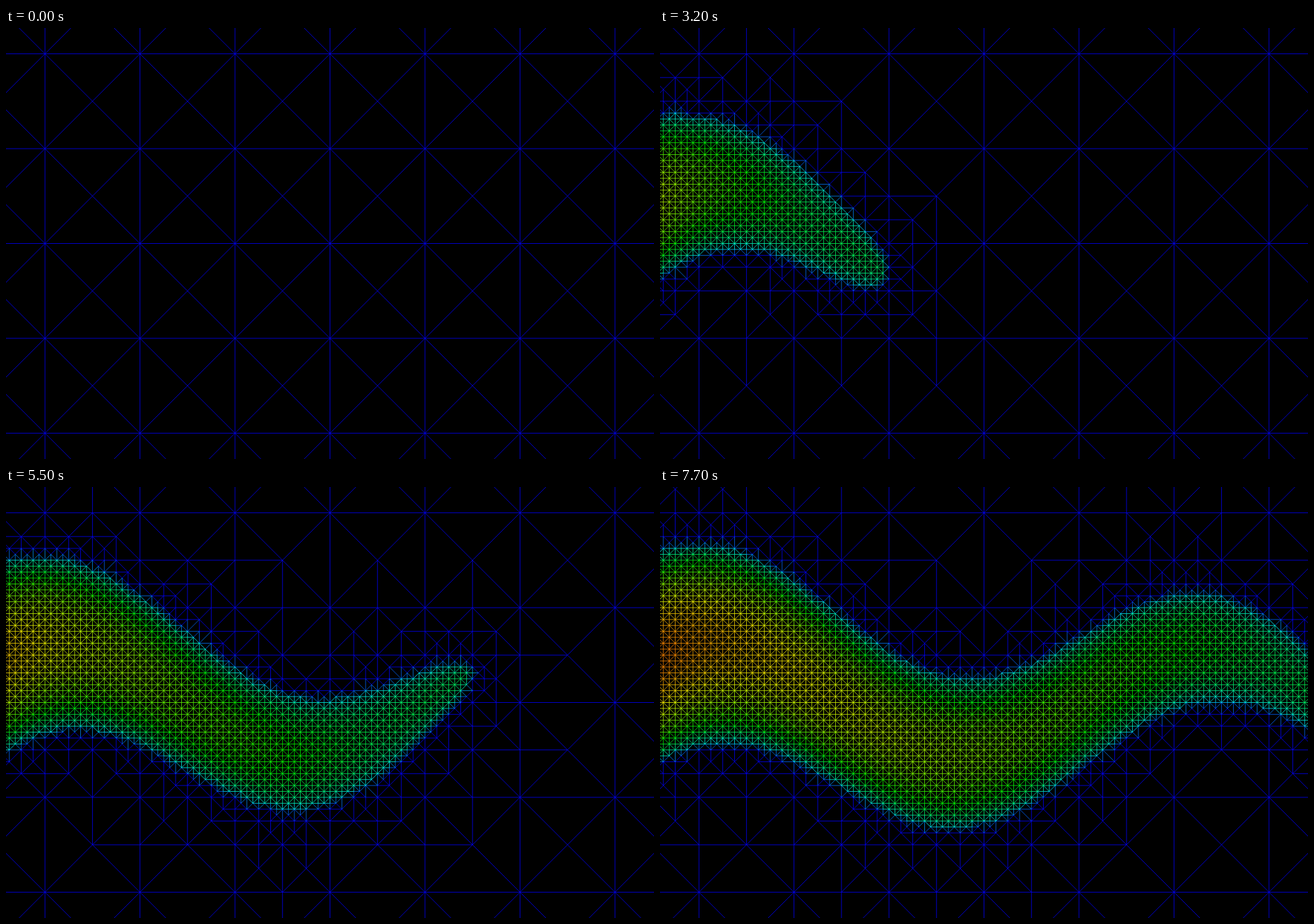
Write an HTML page with a canvas that moves like this. It is 917 px wide and 611 px high and loops after 8.7 s.

```html
<!DOCTYPE html>
<html lang="en">
<head>
<meta charset="utf-8">
<title>Adaptive mesh flow</title>
<style>
html, body { margin: 0; width: 100%; height: 100%; overflow: hidden; background: #000; }
canvas { display: block; }
</style>
</head>
<body>
<canvas id="stage" width="917" height="611"></canvas>
<script>
const stage = document.getElementById('stage');
const ctx = stage.getContext('2d');
const LOOP = 8700, STEP = 100, LAST = 77;

// Coarse cells of 16 units, each cut into four triangles, centred on the stage
const COLS = 10, ROWS = 6, CELL = 16, DEPTH = 7;
const PITCH = 134.45, UNIT = PITCH / CELL;
const LEFT = (stage.width - COLS * PITCH) / 2;
const TOP = (stage.height - ROWS * PITCH) / 2;
const W = COLS * CELL + 1, H = ROWS * CELL + 1;
const BLUE = 240, SOURCE = -45;

const clamp = (v, lo, hi) => Math.max(lo, Math.min(hi, v));
const mix = (a, b, t) => a + (b - a) * t;

// The front speeds up steadily
const frontAt = step => -51 + 10 * step + 0.0536 * step * step;

// The channel meanders as a cosine
const channel = x =>
  304 - 8 * Math.exp(-Math.max(x, 0) / 300) - 75 * Math.cos(2 * Math.PI * (x - 78) / 694);

// A parabolic nose, wider towards both ends, that thins as the flow lengthens
function halfWidth(front, x) {
  const behind = front - Math.max(x, SOURCE);
  if (behind <= 0) return 0;
  const along = clamp(x / Math.max(front, 1), 0, 1);
  const flare = 1 + 0.65 * (along - 0.35) ** 2;
  return 30 * Math.max(front, 90) ** -0.277 * flare * Math.sqrt(behind);
}

const levels = Array.from({ length: DEPTH + 1 }, () => []);

// a and b end the long side, c is the right angle
function triangle(level, a, b, c) {
  const node = { a, b, c, mid: (a + b) / 2, kids: null };
  levels[level].push(node);
  if (level < DEPTH) {
    node.kids = [triangle(level + 1, a, c, node.mid), triangle(level + 1, c, b, node.mid)];
  }
  return node;
}

for (let r = 0; r < ROWS; r++) {
  for (let c = 0; c < COLS; c++) {
    const nw = r * CELL * W + c * CELL, ne = nw + CELL;
    const sw = nw + CELL * W, se = sw + CELL;
    const centre = (nw + se) / 2;
    [[nw, ne], [ne, se], [se, sw], [sw, nw]].forEach(([a, b]) => triangle(0, a, b, centre));
  }
}

const hue = new Float32Array(W * H);
const split = new Uint8Array(W * H);

// Depth shows as hue: warm in the deep middle, cyan at the rim
function fillField(step) {
  const front = frontAt(step);
  hue.fill(BLUE);
  for (let i = 0; i < W; i++) {
    const x = LEFT + i * UNIT, width = halfWidth(front, x);
    const middle = channel(x), core = Math.min(140, 225 - 1.28 * width);
    for (let j = 0; j < H; j++) {
      const off = Math.abs(TOP + j * UNIT - middle);
      if (off >= width) continue;
      const rim = 33 * Math.exp((off - width) / 13);
      hue[j * W + i] = mix(core, 163, (off / width) ** 2) + rim;
    }
  }
}

// Fine to coarse, so that neighbours always share whole edges
function markSplits() {
  split.fill(0);
  for (let level = DEPTH - 1; level >= 0; level--) {
    for (const { mid, kids } of levels[level]) {
      const needed = level === DEPTH - 1
        ? hue[mid] < BLUE
        : split[kids[0].mid] || split[kids[1].mid];
      if (needed) split[mid] = 1;
    }
  }
}

function drawMesh() {
  const paths = new Map(), seen = new Set();

  function edge(p, q) {
    const key = Math.min(p, q) * W * H + Math.max(p, q);
    if (seen.has(key)) return;
    seen.add(key);
    const tone = Math.round((hue[p] + hue[q]) / 8) * 4;
    if (!paths.has(tone)) paths.set(tone, new Path2D());
    const path = paths.get(tone);
    path.moveTo(LEFT + (p % W) * UNIT, TOP + Math.floor(p / W) * UNIT);
    path.lineTo(LEFT + (q % W) * UNIT, TOP + Math.floor(q / W) * UNIT);
  }

  function visit({ a, b, c, mid, kids }) {
    if (kids && split[mid]) {
      kids.forEach(visit);
    } else {
      edge(a, b);
      edge(b, c);
      edge(c, a);
    }
  }

  levels[0].forEach(visit);
  ctx.fillStyle = '#000';
  ctx.fillRect(0, 0, stage.width, stage.height);
  ctx.lineWidth = 0.75;
  const tones = [...paths.keys()].sort((a, b) => b - a);
  for (const tone of tones) {
    ctx.strokeStyle = `hsl(${tone}, 100%, 50%)`;
    ctx.stroke(paths.get(tone));
  }
}

let shown = -1;
function render(time) {
  const step = Math.min(LAST, Math.floor((time % LOOP) / STEP));
  if (step === shown) return;
  shown = step;
  fillField(step);
  markSplits();
  drawMesh();
}

const start = performance.now();
function tick() {
  render(performance.now() - start);
  requestAnimationFrame(tick);
}
tick();
</script>
</body>
</html>
```
